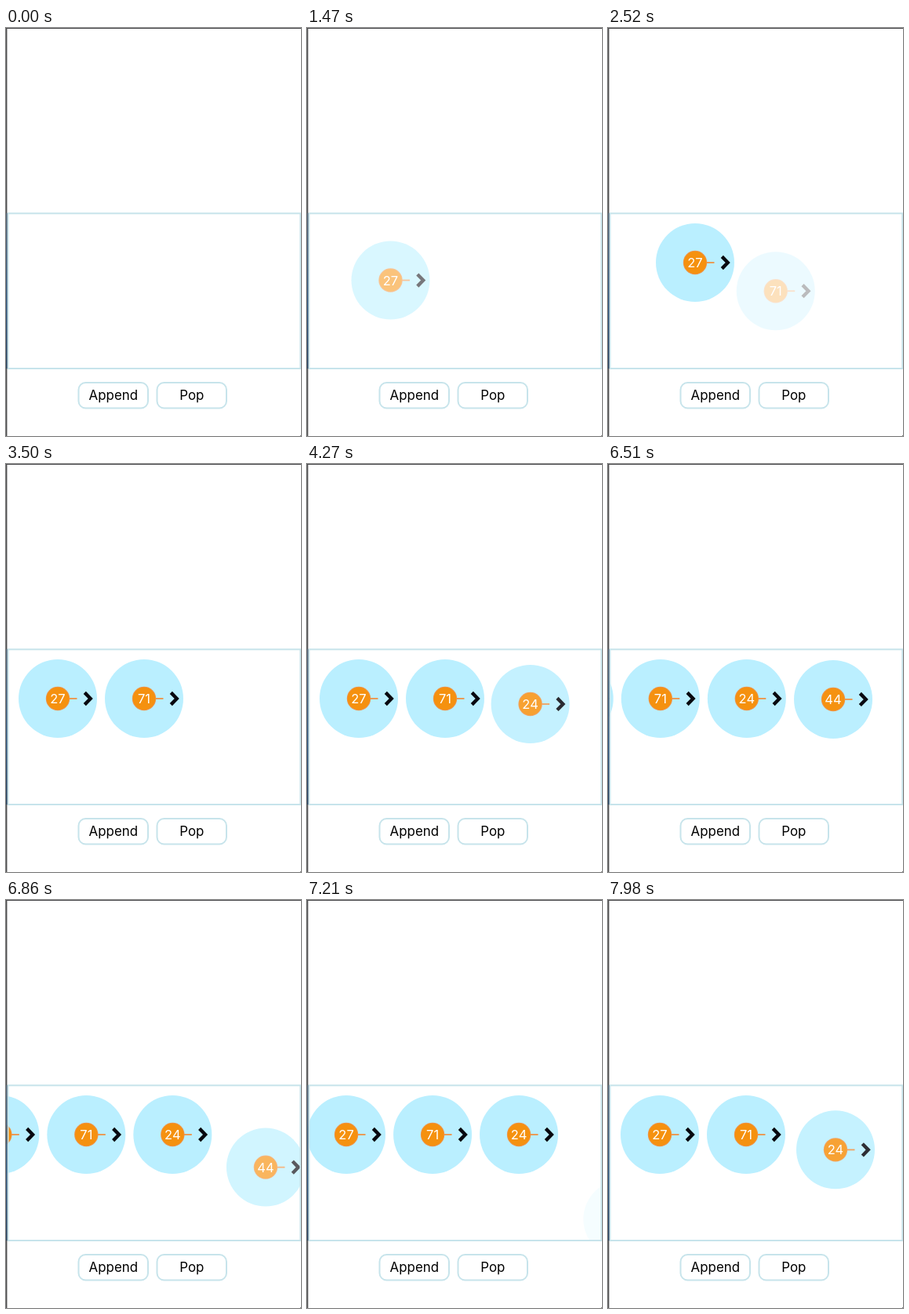
Write an HTML page with a canvas that moves like this. It is 376x520 px and loops after 8 s.

```html
<!DOCTYPE html>
<html lang="en">
<head>
<meta charset="utf-8">
<title>Linked list</title>
<style>
  html, body { margin: 0; width: 100%; height: 100%; overflow: hidden; background: #fff; }
  canvas { display: block; width: 376px; height: 520px; }
</style>
</head>
<body>
<canvas id="stage"></canvas>
<script>
const W = 376, H = 520, LOOP = 8000, TICK = 70;
const SPACING = 110, ROW_Y = 299, FADE_MS = 1040;
const FONT = 'Inter, "Open Sans", sans-serif';
const BORDER = '#c7e4eb', ORANGE = '#f5910f';
const POP_SCROLL = 6445;

const nodes = [
  { value: 27, enter: 920 },
  { value: 71, enter: 2142 },
  { value: 24, enter: 3500, leave: 7697 },
  { value: 44, enter: 4928, leave: POP_SCROLL },
];

const canvas = document.getElementById('stage');
const ctx = canvas.getContext('2d');
const dpr = window.devicePixelRatio || 1;
canvas.width = W * dpr;
canvas.height = H * dpr;

// Ease-in-out: cubic bezier (.42, 0, .58, 1)
function ease(u) {
  if (u <= 0) return 0;
  if (u >= 1) return 1;
  let lo = 0, hi = 1, s = 0.5;
  for (let i = 0; i < 24; i++) {
    s = (lo + hi) / 2;
    const x = 1.26 * (1 - s) ** 2 * s + 1.74 * (1 - s) * s * s + s ** 3;
    if (x < u) lo = s; else hi = s;
  }
  return s * s * (3 - 2 * s);
}

const progress = (t, start) => ease((t - start) / FADE_MS);

function firstNodeX(t) {
  if (t < 3430) return 111;
  if (t < 4760) return 66;
  return -44 + SPACING * progress(t, POP_SCROLL);
}

function disc(x, y, r, color) {
  ctx.fillStyle = color;
  ctx.beginPath();
  ctx.arc(x, y, r, 0, Math.PI * 2);
  ctx.fill();
}

function polyline(points, color, width) {
  ctx.strokeStyle = color;
  ctx.lineWidth = width;
  ctx.beginPath();
  for (const [x, y] of points) ctx.lineTo(x, y);
  ctx.stroke();
}

function label(text, x, baseline, size, color) {
  ctx.font = `${size}px ${FONT}`;
  ctx.fillStyle = color;
  ctx.textAlign = 'center';
  ctx.fillText(text, x, baseline);
}

function drawNode(value, x, y, opacity) {
  disc(x, y, 50, '#baefff');
  polyline([[x + 14, y], [x + 24.5, y]], '#ef9245', 1.8);
  disc(x, y, 15.2, '#ef9245');
  disc(x, y, 14.2, ORANGE);
  label(value, x, y + 6.1, 16.5, '#fff');
  polyline([[x + 34.3, y - 7.6], [x + 41.7, y], [x + 34.3, y + 7.6]], '#08080f', 4.4);
  // Veil fades the node as one group
  if (opacity < 1) disc(x, y, 51, `rgba(255,255,255,${1 - opacity})`);
}

function drawNodes(t) {
  const left = firstNodeX(t);
  ctx.save();
  ctx.beginPath();
  ctx.rect(1, 236, W - 1, 198);
  ctx.clip();
  nodes.forEach(({ value, enter, leave = Infinity }, i) => {
    const culled = i === 0 && t >= 4760 && t < POP_SCROLL;
    const shown = progress(t, enter), gone = progress(t, leave);
    const opacity = shown * (1 - gone);
    if (culled || opacity <= 0) return;
    const x = left + SPACING * i - 10 * (1 - shown) + 26 * gone;
    const y = ROW_Y + 50 * (1 - shown) + 126 * gone;
    drawNode(value, x, y, opacity);
  });
  ctx.restore();
}

function drawButton(text, x) {
  ctx.strokeStyle = BORDER;
  ctx.lineWidth = 2;
  ctx.beginPath();
  ctx.roundRect(x, 452, 88.5, 32.5, 9);
  ctx.stroke();
  label(text, x + 44.3, 474.3, 16.9, '#000');
}

function drawChrome() {
  ctx.strokeStyle = BORDER;
  ctx.lineWidth = 2;
  ctx.strokeRect(2.5, 236.3, 372.8, 197.7);
  drawButton('Append', 92.5);
  drawButton('Pop', 192.5);
  ctx.fillStyle = '#4b4b4d';
  ctx.fillRect(0, 0, W, 1);
  ctx.fillRect(0, 0, 1.4, H);
  const edge = ctx.createLinearGradient(0, 236, 0, 434);
  edge.addColorStop(0, '#52677a');
  edge.addColorStop(0.6, '#2c5680');
  edge.addColorStop(1, '#23405f');
  ctx.fillStyle = edge;
  ctx.fillRect(0, 236, 1.4, 198);
  ctx.fillStyle = '#777';
  ctx.fillRect(W - 1, H - 1, 1, 1);
}

function frame(now) {
  const t = Math.floor((now % LOOP) / TICK) * TICK;
  ctx.setTransform(dpr, 0, 0, dpr, 0, 0);
  ctx.fillStyle = '#fff';
  ctx.fillRect(0, 0, W, H);
  drawNodes(t);
  drawChrome();
  requestAnimationFrame(next);
}

let start;
function next(now) {
  start ??= now;
  frame(Math.max(0, now - start));
}
requestAnimationFrame(next);
</script>
</body>
</html>
```
